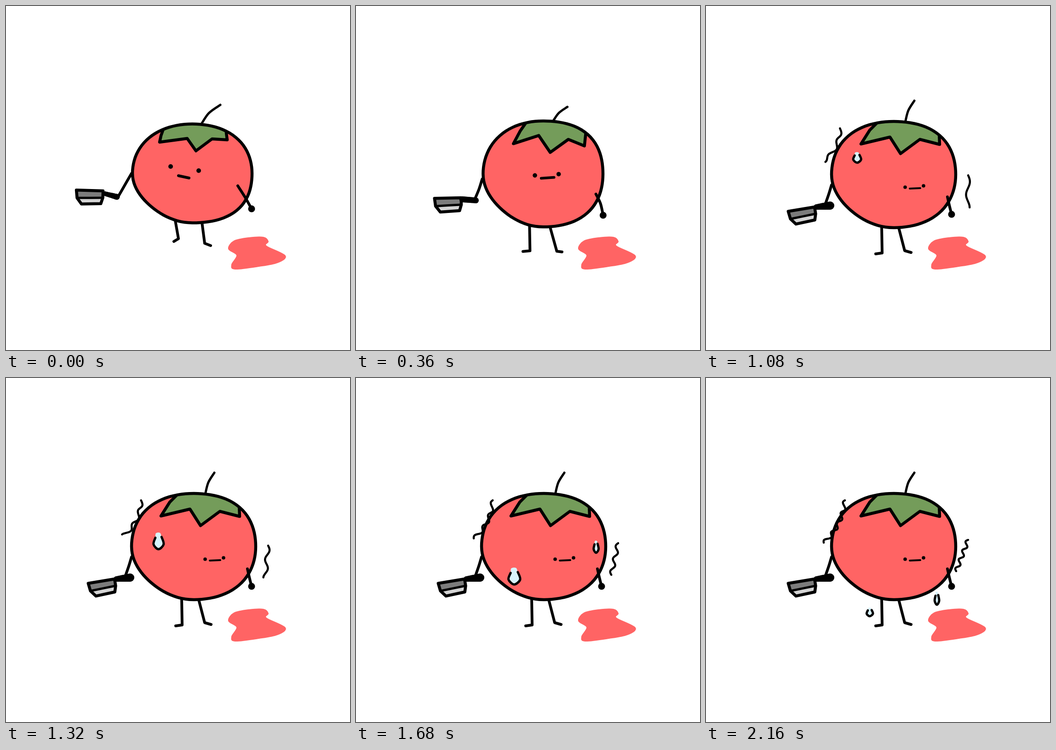
Animation of 748x748 px, one loop 2280 ms. Source, as an HTML page with a canvas:

```html
<!DOCTYPE html>
<html lang="en">
<head>
<meta charset="utf-8">
<title>Nervous tomato</title>
<style>
html, body { margin: 0; width: 100%; height: 100%; overflow: hidden; background: #fff; }
canvas { display: block; }
</style>
</head>
<body>
<canvas id="stage" width="748" height="748"></canvas>
<script>
const ctx = document.getElementById('stage').getContext('2d');
const STEP = 120, STEPS = 19, SHAKE_START = 8;
const RED = '#ff6464', GREEN = '#749c5a', PALE = '#d8f3fc';

// Blends numbers, or arrays of the same shape.
const mix = (a, b, u) => Array.isArray(a) ? a.map((v, i) => mix(v, b[i], u)) : a + (b - a) * u;

// Value at time t from [time, value] keys, held at both ends.
function at(keys, t) {
  const n = keys.findIndex(key => key[0] >= t);
  if (n < 0) return keys[keys.length - 1][1];
  if (n === 0) return keys[0][1];
  const [a, b] = [keys[n - 1], keys[n]];
  return mix(a[1], b[1], (t - a[0]) / (b[0] - a[0]));
}

// "x,y x,y" -> [[x, y], ...]
const pts = s => s.split(' ').map(p => p.split(',').map(Number));
const poses = (...list) => list.map((v, i) => [i, typeof v === 'string' ? pts(v) : v]);

// Key points per pose: tilted, upright, resting (and looking down).
// Body: centre, radii, bulge of each quarter clockwise from lower right.
const body = poses(
  [405, 364, 130, 107.5, 0.055, -0.04, 0.02, 0.03],
  [406, 364.5, 128, 115, 0.05, -0.04, 0.015, 0.06],
  [408, 366.5, 135, 115.5, 0.03, -0.035, 0.03, 0.045]);
const leaf = poses(
  '342,268 337,282 334,296 394,288 413,315 448,289 481,291 479,276',
  '371,249 358,272 345,299 396,280 422,317 460,290 491,306 496,276',
  '376,250 356,270 337,300 400,285 423,321 465,290 508,301 507,277');
const stem = poses('424,258 441,233 466,215', '427,249 442,235 463,226', '434,249 440,227 453,206');
const knifeArm = poses('273,364 258,390 243,416', '275,370 268,392 257,417', '273,389 267,409 260,429');
const handle = poses('215,408,5 241,415,6.5', '227,412,7 256,417,5', '240,437,6 270,434,9');
const bladePlace = poses([211, 402, 0.03], [225, 407, 0.05], [236, 437, -0.165]);
const freeArm = poses('504,391 520,416 534,441', '520,406 533,428 539,456', '525,415 529,433 534,453');
const leftLeg = poses('366,455 375,506 365,512', '375,475 376,530 360,531', '382,480 383,537 369,539');
const rightLeg = poses('426,470 432,516 445,521', '424,482 439,534 449,534', '419,482 432,532 446,536');
// Face: both eyes, then both ends of the mouth.
const face = poses(
  '358,349 419,358 375,369 398,374', '372,359 424,357 386,366 413,364',
  '423,387 474,383 436,392 466,390', '433,394 473,391 443,397 466,396');

const poseTime = [[0, 0], [2, 1], [5, 2], [6, 2], [8, 3]];
const puddle = pts('484,528 496,511 528,504 560,503 570,512 566,522 607,543 590,558 550,566 498,572 491,562 502,542');
const blade = pts('0,0 -58,0 -56,17 -46,30 -4,28 0,15');

// Sweat: [step, [x, y, half width, half height]]
const sweats = [
  [[8, [327, 317, 7.5, 8]], [12, [333, 367, 12.5, 21]], [14, [344, 431, 13, 18]], [18, [356, 509, 7, 9]]],
  [[12, [510, 324, 7, 11]], [14, [522, 367, 5.5, 13]], [18, [502, 479, 5, 14]]]
];

function trace(p, closed, curved) {
  const n = p.length;
  const pick = i => closed ? p[(i + n) % n] : p[Math.max(0, Math.min(n - 1, i))];
  ctx.beginPath();
  ctx.moveTo(...p[0]);
  for (let i = 0; i < (closed ? n : n - 1); i++) {
    const [a, b, c, d] = [-1, 0, 1, 2].map(j => pick(i + j));
    if (curved) {
      ctx.bezierCurveTo(b[0] + (c[0] - a[0]) / 6, b[1] + (c[1] - a[1]) / 6,
        c[0] - (d[0] - b[0]) / 6, c[1] - (d[1] - b[1]) / 6, ...c);
    } else ctx.lineTo(...c);
  }
  if (closed) ctx.closePath();
}

function ink(width, color = '#000') {
  ctx.lineWidth = width;
  ctx.strokeStyle = color;
  ctx.stroke();
}

function line(p, width, curved = true) {
  trace(p, false, curved);
  ink(width);
}

function shape(p, fill, curved = true) {
  trace(p, true, curved);
  ctx.fillStyle = fill;
  ctx.fill();
}

function dot([x, y], r) {
  ctx.beginPath();
  ctx.arc(x, y, r, 0, 7);
  ctx.fillStyle = '#000';
  ctx.fill();
}

function bodyOutline(k) {
  const [x, y, rx, ry, ...bulge] = at(body, k);
  return Array.from({ length: 48 }, (_, i) => {
    const a = i * Math.PI / 24;
    const r = 1 + bulge[Math.floor(i / 12)] * Math.sin(2 * a) ** 2;
    return [x + rx * r * Math.cos(a), y + ry * r * Math.sin(a)];
  });
}

function drawBody(k) {
  const outline = bodyOutline(k), edge = at(leaf, k);
  const [first, last] = [edge[0], edge[edge.length - 1]];
  shape(outline, RED);
  ctx.save();
  ctx.clip();
  // The leaf reaches past the top; the body cuts it off.
  shape([...edge, [last[0], last[1] - 40], [first[0], first[1] - 40]], GREEN, false);
  ink(6.5);
  ctx.restore();
  trace(outline, true, true);
  ink(6.5);
}

function drawKnife(k) {
  const [x, y, angle] = at(bladePlace, k), [c, s] = [Math.cos(angle), Math.sin(angle)];
  const b = blade.map(([px, py]) => [x + px * c - py * s, y + px * s + py * c]);
  line(at(knifeArm, k), 6);
  shape(b, '#d3d3d3', false);
  shape([b[0], b[1], b[2], b[5]], '#7c7c7c', false);
  trace(b, true, false);
  ink(6.5);
  line([b[2], b[5]], 5);
  const [from, to] = at(handle, k);
  for (let u = 0; u <= 1; u += 0.1) {
    const [hx, hy, r] = mix(from, to, u);
    dot([hx, hy], r);
  }
}

function drawFace(k) {
  const [left, right, ...mouth] = at(face, k);
  const fine = Math.max(0, k - 1) / 2;
  dot(left, mix(5, 3.8, fine));
  dot(right, mix(5, 3.8, fine));
  line(mouth, mix(6, 4, fine));
}

function drawSweat(keys, step) {
  if (step < keys[0][0]) return;
  const [x, y, w, h] = at(keys, step);
  const place = ([px, py]) => [x + px * w, y + py * h];
  const rim = pts('-.6,-.4 -.95,.4 0,1 1,.4 .6,-.5').map(place);
  shape([...rim, ...pts('.3,-1 -.5,-.95').map(place)], PALE);
  line(rim, 5);
}

// Wavy stroke from a to b, bowed sideways by bow.
function squiggle(a, b, bow, turns, phase) {
  const [dx, dy] = [b[0] - a[0], b[1] - a[1]], length = Math.hypot(dx, dy);
  const wave = Array.from({ length: 41 }, (_, i) => {
    const u = i / 40;
    const off = bow * 4 * u * (1 - u) + 4 * Math.sin(u * turns * 2 * Math.PI + phase);
    return [a[0] + dx * u - dy / length * off, a[1] + dy * u + dx / length * off];
  });
  line(wave, 4.5);
}

function drawShake(step) {
  const u = (step - SHAKE_START) / (STEPS - 1 - SHAKE_START);
  if (u < 0) return;
  const turns = mix(2, 4.5, u), phase = step % 2 * Math.PI;
  squiggle([mix(290, 302, u), 266], [256, mix(335, 358, u)], -10, turns, phase);
  squiggle([570, mix(370, 352, u)], [mix(572, 544, u), mix(440, 420, u)], 0, turns - 1, phase);
}

function draw(step) {
  const k = at(poseTime, step);
  ctx.fillStyle = '#fff';
  ctx.fillRect(0, 0, 748, 748);
  ctx.lineCap = ctx.lineJoin = 'round';

  shape(puddle, RED);
  ink(2, RED);
  line(at(leftLeg, k), 6, false);
  line(at(rightLeg, k), 6, false);
  line(at(stem, k), 5);
  drawKnife(k);
  drawBody(k);
  drawFace(k);

  const arm = at(freeArm, k);
  line(arm, 6);
  dot(arm[2], 7.5);

  sweats.forEach(keys => drawSweat(keys, step));
  drawShake(step);
}

function tick() {
  draw(Math.floor(performance.now() / STEP) % STEPS);
  requestAnimationFrame(tick);
}
tick();
</script>
</body>
</html>
```
